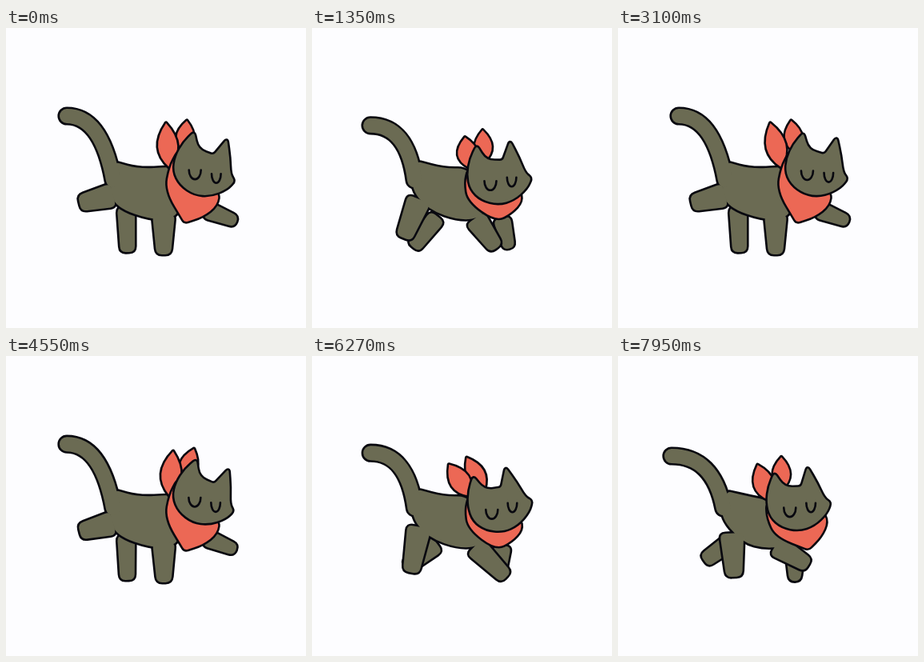
Write an HTML page with a canvas that moves like this. It is 375 px wide and 375 px high and loops after 7990 ms.

```html
<!DOCTYPE html>
<html lang="en">
<head>
<meta charset="utf-8">
<title>Walking cat</title>
<style>
  html, body { margin: 0; width: 100%; height: 100%; overflow: hidden; background: #fdfdff; }
  canvas { display: block; width: 100vmin; height: 100vmin; }
</style>
</head>
<body>
<canvas id="stage"></canvas>
<script>
const SIZE = 375, LOOP = 7990;
const FUR = '#6b6b53', SCARF = '#ec6855', INK = '#08080f';
const LINE = 2.6;

const canvas = document.getElementById('stage');
const ctx = canvas.getContext('2d');
const density = window.devicePixelRatio || 1;
canvas.width = canvas.height = SIZE * density;
ctx.scale(density, density);
ctx.lineJoin = ctx.lineCap = 'round';

// Poses of one walk cycle. The second gather has near and far legs exchanged.
const REACH = 0, GATHER = 1, CROSS = 2, REGATHER = 3;
const cycle = [
  [0, REACH], [0.15, REACH], [0.24, GATHER], [0.40, CROSS],
  [0.46, CROSS], [0.66, REGATHER], [0.82, REACH], [1, REACH]
];

// Each joint lists its place in reach, gather and cross.
const joints = {
  tailTip: [[76, 110], [73, 122], [65, 126]],
  tailRoot: [[134, 190], [128, 190], [133, 190]],
  croup: [[137, 168], [132, 167], [139, 170]],
  rump: [[129, 196], [122, 198], [127, 198]],
  groin: [[136, 224], [145, 227], [158, 235]],
  neck: [[204, 174], [197, 175], [186, 182]],
  bowTip: [[200, 119], [180, 137], [161, 136]],
  backBowBase: [[222, 156], [215, 168], [201, 167]],
  backBowTip: [[226, 116], [202, 128], [193, 126]],
  head: [[248, 175], [233, 185], [222, 182]]
};
const legs = {
  nearHind: { hip: [[134, 209], [134, 214], [145, 224]], foot: [[92, 219], [115, 263], [155, 280]], width: [15, 10] },
  farHind: { hip: [[150, 224], [157, 236], [136, 231]], foot: [[152, 280], [126, 274], [102, 250]], width: [11, 9] },
  nearFront: { hip: [[197, 233], [204, 238], [195, 236]], foot: [[197, 283], [231, 275], [240, 257]], width: [14, 9] },
  farFront: { hip: [[250, 227], [237, 238], [216, 253]], foot: [[288, 242], [246, 276], [213, 283]], width: [11, 7] }
};
const partner = {
  nearHind: 'farHind', farHind: 'nearHind', nearFront: 'farFront', farFront: 'nearFront'
};

// Upright shapes around the middle of the head.
const headShape = [
  [-22, -41], [-32, -26], [-38, -7], [-37, 12], [-25, 27], [-5, 35], [15, 32],
  [33, 20], [40, 8], [33, 1], [28, -19], [20, -41], [8, -18], [-13, -21]
];
const bibShape = [[-38, -6], [-41, 12], [-36, 38], [0, 64], [19, 51], [31, 34], [27, 18]];

const mix = (a, b, k) => a + (b - a) * k;
const ease = k => k * k * (3 - 2 * k);

function poseWeights(phase) {
  const next = cycle.findIndex(([at]) => at > phase);
  const [from, a] = cycle[next - 1], [to, b] = cycle[next];
  const k = ease((phase - from) / (to - from));
  const weights = [0, 0, 0, 0];
  weights[a] += 1 - k;
  weights[b] += k;
  return weights;
}

// A missing fourth value repeats the first gather.
function blend(values, weights) {
  return weights.reduce((sum, w, i) => sum + w * (values[i] ?? values[GATHER]), 0);
}

function blendPoint(points, weights) {
  return [0, 1].map(axis => blend(points.map(p => p[axis]), weights));
}

function place(shape, [x, y], degrees, stretch = 1) {
  const angle = degrees * Math.PI / 180, c = Math.cos(angle), s = Math.sin(angle);
  return shape.map(([px, py]) => [
    x + px * c - py * stretch * s,
    y + px * s + py * stretch * c
  ]);
}

// Closed outline: soft through shallow bends, tight at sharp corners.
function outline(points, tight = 4, soft = 99) {
  const path = new Path2D(), n = points.length;
  points.forEach((p, i) => {
    const before = points[(i + n - 1) % n], after = points[(i + 1) % n];
    const inX = p[0] - before[0], inY = p[1] - before[1];
    const outX = after[0] - p[0], outY = after[1] - p[1];
    const inLen = Math.hypot(inX, inY) || 1, outLen = Math.hypot(outX, outY) || 1;
    const bend = (inX * outX + inY * outY) / (inLen * outLen);
    const limit = bend < 0.4 ? tight : soft;
    const a = Math.min(limit, inLen / 2) / inLen;
    const b = Math.min(limit, outLen / 2) / outLen;
    path[i ? 'lineTo' : 'moveTo'](p[0] - inX * a, p[1] - inY * a);
    path.quadraticCurveTo(p[0], p[1], p[0] + outX * b, p[1] + outY * b);
  });
  path.closePath();
  return path;
}

// Unit vector across the line from a to b.
function across([ax, ay], [bx, by]) {
  const length = Math.hypot(bx - ax, by - ay);
  return [(ay - by) / length, (bx - ax) / length];
}

const shift = ([x, y], [dx, dy], k) => [x + dx * k, y + dy * k];

function legPath(name, weights) {
  const { hip, foot, width } = legs[name];
  const top = blendPoint(hip, weights);
  const end = blendPoint([...foot, legs[partner[name]].foot[GATHER]], weights);
  const side = across(top, end);
  return outline([
    shift(top, side, width[0]), shift(end, side, width[1]),
    shift(end, side, -width[1]), shift(top, side, -width[0])
  ], 7, 7);
}

function leafPath(base, tip, bulge) {
  const side = across(base, tip), path = new Path2D();
  const middle = [mix(base[0], tip[0], 0.45), mix(base[1], tip[1], 0.45)];
  path.moveTo(...base);
  path.quadraticCurveTo(...shift(middle, side, bulge), ...tip);
  path.quadraticCurveTo(...shift(middle, side, -bulge), ...base);
  return path;
}

function tailPath(tip, root) {
  const path = new Path2D();
  path.moveTo(...tip);
  path.quadraticCurveTo(119, tip[1], ...root);
  return path;
}

function strokePath(path, color, width) {
  ctx.strokeStyle = color;
  ctx.lineWidth = width;
  ctx.stroke(path);
}

// Ink goes under all the fills, so overlapping shapes join into one.
function paint(color, paths, tail) {
  const tailWidth = 18;
  paths.forEach(path => strokePath(path, INK, LINE * 2));
  if (tail) strokePath(tail, INK, tailWidth + LINE * 2);
  ctx.fillStyle = color;
  paths.forEach(path => ctx.fill(path));
  if (tail) strokePath(tail, color, tailWidth);
}

function drawEye(x, y, width, depth) {
  const lid = new Path2D();
  lid.ellipse(x, y, width, depth, 0, 0, Math.PI);
  strokePath(lid, INK, LINE);
}

function drawCat(phase) {
  const weights = poseWeights(phase);
  const at = name => blendPoint(joints[name], weights);
  const leg = name => legPath(name, weights);
  const follow = Math.sin(phase * 2 * Math.PI);
  const flutter = point => shift(point, [11, 0], follow);

  const neck = at('neck'), head = at('head');
  const tilt = blend([12, -13, -15], weights) + 5 * follow;
  const body = outline([
    at('croup'), [166, 176], neck, [220, 214], [214, 236], [186, 241], at('groin'), at('rump')
  ]);

  paint(FUR, [leg('farHind')]);
  paint(FUR, [leg('farFront')]);
  paint(FUR, [body, leg('nearHind'), leg('nearFront')], tailPath(at('tailTip'), at('tailRoot')));
  paint(SCARF, [leafPath(at('backBowBase'), flutter(at('backBowTip')), 21)]);
  paint(SCARF, [leafPath(neck, flutter(at('bowTip')), 24)]);
  paint(SCARF, [outline(place(bibShape, head,
    blend([20, 3, -18], weights), blend([1.13, 0.88, 0.96], weights)))]);
  paint(FUR, [outline(place(headShape, head, tilt))]);

  const [left, right] = place([[-11, 5], [16, 4]], head, tilt);
  drawEye(...left, 7.5, 11.5);
  drawEye(...right, 5.8, 11.5);
}

// The walk pauses once and then goes on a little faster.
function walkPhase(time) {
  const pause = 5540, resume = 5680;
  return time < resume ? Math.min(time, pause) / 1095 : 5.1 + (time - resume) / 1010;
}

const start = performance.now();
function tick() {
  const time = (performance.now() - start) % LOOP;
  ctx.fillStyle = '#fdfdff';
  ctx.fillRect(0, 0, SIZE, SIZE);
  drawCat(walkPhase(time) % 1);
  requestAnimationFrame(tick);
}
tick();
</script>
</body>
</html>
```
